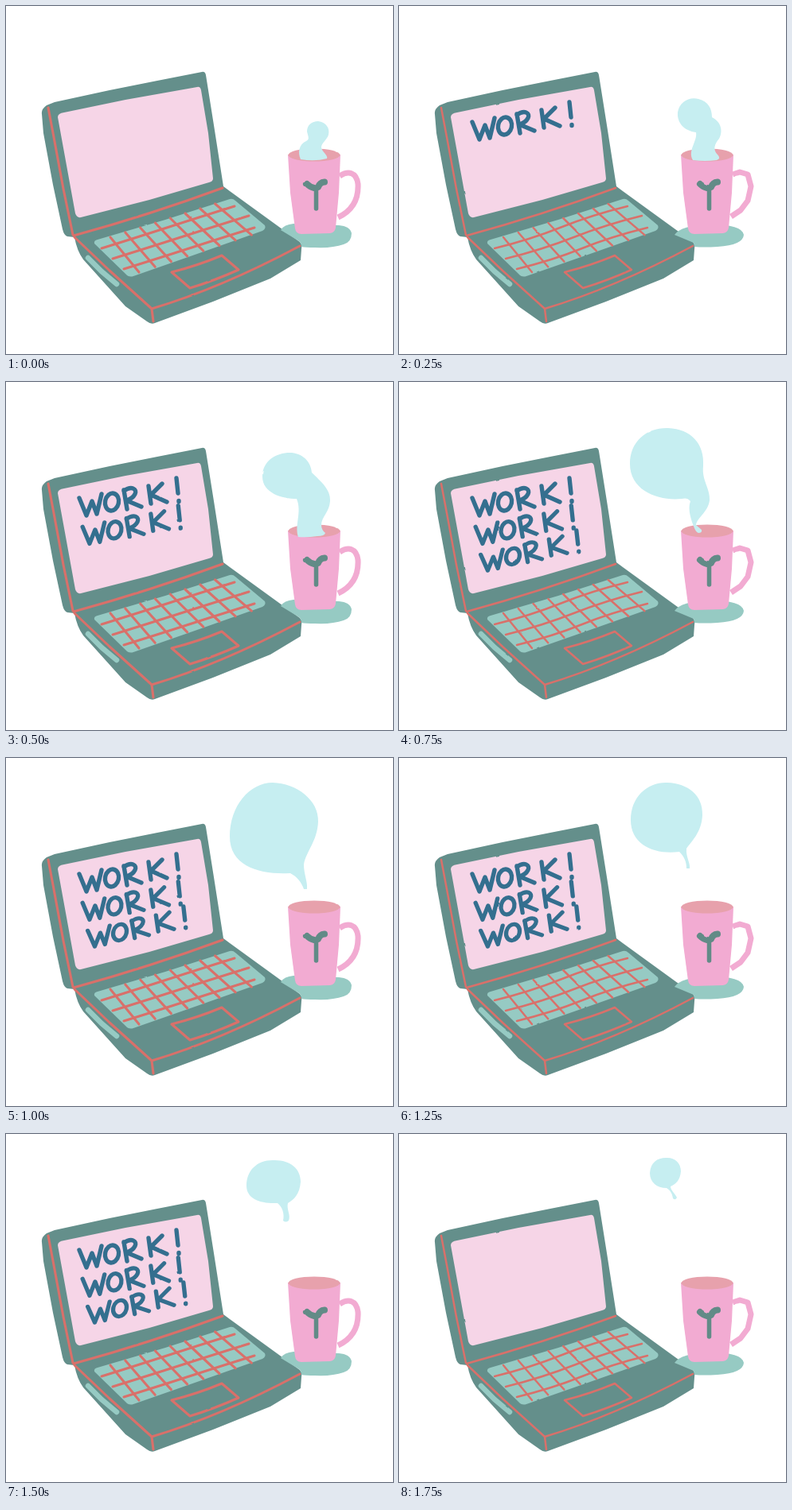
An HTML page that plays this animation: 486 by 438 pixels, repeating every 2 s.

```html
<!DOCTYPE html>
<html lang="en">
<head>
<meta charset="utf-8">
<title>Work, work, work</title>
<style>
  html, body { margin: 0; width: 100%; height: 100%; overflow: hidden; background: #fff; }
  svg { display: block; width: 486px; height: 438px; }
  .line { fill: none; stroke: #d9706a; stroke-linecap: round; stroke-linejoin: round; }
  .ink { fill: none; stroke: #346f8f; stroke-width: 5.4; stroke-linecap: round; stroke-linejoin: round; }
  .sprout { fill: none; stroke: #628b87; stroke-linecap: round; }
  .teal { fill: #648f8b; }
  .mint { fill: #96cac3; }
  .pink { fill: #f2abd2; }
</style>
</head>
<body>
<svg viewBox="0 0 486 438" role="img" aria-label="Laptop showing WORK! beside a steaming mug">
  <defs>
    <filter id="rough0" x="0" y="0" width="486" height="438" filterUnits="userSpaceOnUse" color-interpolation-filters="sRGB">
      <feTurbulence type="fractalNoise" baseFrequency=".1" seed="4"/>
      <feDisplacementMap in="SourceGraphic" scale="1.8" xChannelSelector="R" yChannelSelector="G"/>
    </filter>
    <filter id="rough1" x="0" y="0" width="486" height="438" filterUnits="userSpaceOnUse" color-interpolation-filters="sRGB">
      <feTurbulence type="fractalNoise" baseFrequency=".1" seed="11"/>
      <feDisplacementMap in="SourceGraphic" scale="1.8" xChannelSelector="R" yChannelSelector="G"/>
    </filter>
    <g id="word" class="ink">
      <path d="M92 146L101 168L108 150L114 166L120 141"/>
      <ellipse cx="133" cy="151" rx="8.500" ry="11" transform="rotate(12 133 151)"/>
      <path d="M148 136L152 160M148 137C158 130 165 135 162 141Q159 147 151 149L170 157"/>
      <path d="M179 131L182 153M196 128L182 142L202 151"/>
      <path d="M214 121L216 140M217 149.500V150.500"/>
    </g>
  </defs>
  <g id="scene">
    <path class="teal" d="M45 136Q44 130 51 125L61 121L130 106L190 94L246 83Q250 82 251 87L261 150L273 227L281 233L369 297Q372 300 371 306L370 320L332 343L260 372L187 399Q182 401 177 397L150 378L97 319Q89 308 86 291L77 290Q73 289 71 281L59 225L47 160Z"/>
    <path fill="#f6d5e7" d="M65 140Q65 135 73 134L150 118L240 102Q244 101 245 106L254 160L260 217Q260 221 255 222L180 244L94 266Q89 267 87 261L75 195Z"/>
    <path class="mint" d="M111 299Q110 295 115 294L200 269L281 243Q285 242 288 245L325 276Q327 280 322 283L240 312L160 340Q154 342 150 337Z"/>
    <path d="M103 317L120 334L139 350" fill="none" stroke="#96cac3" stroke-width="6.500" stroke-linecap="round"/>
    <path id="keys" class="line"/>
    <path id="seams" class="line" d="M53 128L60 165L72 230L84 288M85 289Q180 263 272 229M86 291L130 333L183 381Q270 355 369 302M183 381L185 397M208 335Q240 327 271 314L292 332Q261 346 231 355Z"/>
    <g id="words"></g>
    <path id="coaster" class="mint"/>
    <path id="handle" fill="none" stroke="#f2abd2" stroke-width="7" stroke-linejoin="round"/>
    <path class="pink" d="M354 187L420 187L418 235L414 279Q413 285 407 286L371 287Q364 287 363 280L357 235Z"/>
    <ellipse cx="387" cy="187.500" rx="32.500" ry="8" fill="#e7a1ac"/>
    <path class="sprout" stroke-width="5.500" d="M389.500 230V255"/>
    <path class="sprout" stroke-width="8" d="M378 224Q382 228 387 229M392 228Q394 222 400 221.500"/>
    <path id="steam" fill="#c6eef1"/>
  </g>
</svg>
<script>
const $ = id => document.getElementById(id);
const STEP = 250;

// One cloud and a line count for each drawing in the loop.
const poses = [
  [0, "M370 193C366 184 368 174 377 170C382 168 379 163 378 158C378 150 384 145 392 145C402 146 407 154 405 162C403 169 396 172 396 178C397 184 405 188 403 192Q388 196 370 193Z"],
  [1, "M369 194C362 182 375 170 373 159C358 157 349 147 350 134C352 121 364 114 376 117C389 120 393 130 393 140C405 146 407 158 402 167C396 174 394 181 400 187Q405 192 399 194Q384 196 369 194Z"],
  [2, "M367 195C362 180 372 164 365 147C347 147 322 140 322 119C322 98 341 88 359 89C375 91 383 102 384 114C395 125 408 135 407 150C406 164 396 170 396 180Q396 186 401 190Q400 194 391 194Q378 196 367 195Z"],
  [3, "M371 184C367 174 362 160 366 150C363 146 359 146 355 147C326 150 290 137 290 103C290 74 312 57 338 58C367 59 384 78 382 106C380 124 391 134 390 149C388 164 374 171 373 180L380 186Q381 190 376 190Q373 189 371 184Z"],
  [3, "M374 165C371 156 365 149 357 145C320 147 281 137 281 99C281 60 306 31 335 31C365 32 393 53 392 80C391 105 377 117 374 134C374 146 379 156 378 165Z"],
  [3, "M361 139C361 130 358 124 352 118C322 122 291 110 291 78C291 48 313 30 337 31C363 32 382 47 381 72C380 94 367 105 361 114C360 124 366 132 365 139Z"],
  [3, "M348 109C350 100 347 92 341 87C320 88 302 82 302 65C302 46 315 33 335 33C356 32 370 43 370 60C369 76 361 83 354 87C352 95 358 102 355 109Q351 112 348 109Z"],
  [0, "M344 81C343 75 341 71 336 68C324 68 315 61 315 49C316 36 324 30 335 30C346 29 354 36 354 47C353 58 348 63 341 66C341 71 347 75 349 80Q347 84 344 81Z"]
];

const lineSpots = [
  "translate(0 0)",
  "matrix(.985 -.02 0 .97 5.5 42.5)",
  "matrix(.985 -.06 0 .93 12 87)"
];
$("words").innerHTML = lineSpots.map(m => `<use href="#word" transform="${m}"/>`).join("");
const lines = [...$("words").children];

const looks = [
  {
    line: 3.1,
    coaster: "M345 282Q349 275 361 274L418 276Q432 277 434 286Q434 297 424 300Q410 305 388 304Q376 304 371 303Q371 298 368 296Z",
    handle: "M419 214C430 207 440 209 442 224C443 244 434 258 417 266"
  },
  {
    line: 2.5,
    coaster: "M346 288Q354 276 390 275Q431 275 433 288Q432 301 400 303Q382 304 371 303L370 298Z",
    handle: "M419 212L428 209L438 212L442 227L438 245L429 257L417 265"
  }
];

function keyLines(wave) {
  const rows = [[120, 305, 287, 252], [134, 318, 305, 264], [148, 331, 312, 279]];
  let d = rows.map(([x, y, x2, y2]) =>
    `M${x} ${y}Q${x + 45} ${y - 14 + wave} ${(x + x2) / 2} ${(y + y2) / 2}T${x2} ${y2}`).join("");
  for (let i = 0; i < 8; i++) {
    d += `M${131 + i * 18.8} ${291 - i * 6}L${167 + i * 20.2} ${335 - i * 6.7}`;
  }
  return d;
}

let shown = -1;
function draw(time) {
  const step = Math.floor(time / STEP) % poses.length;
  if (step === shown) return;
  shown = step;
  const [count, cloud] = poses[step];
  const variant = step % 2, look = looks[variant];
  $("scene").setAttribute("filter", `url(#rough${variant})`);
  $("steam").setAttribute("d", cloud);
  $("coaster").setAttribute("d", look.coaster);
  $("handle").setAttribute("d", look.handle);
  $("keys").setAttribute("d", keyLines(variant * 3));
  for (const id of ["keys", "seams"]) $(id).setAttribute("stroke-width", look.line);
  lines.forEach((line, i) => line.setAttribute("visibility", i < count ? "visible" : "hidden"));
}

const start = performance.now();
function tick() {
  draw(performance.now() - start);
  requestAnimationFrame(tick);
}
tick();
</script>
</body>
</html>
```
